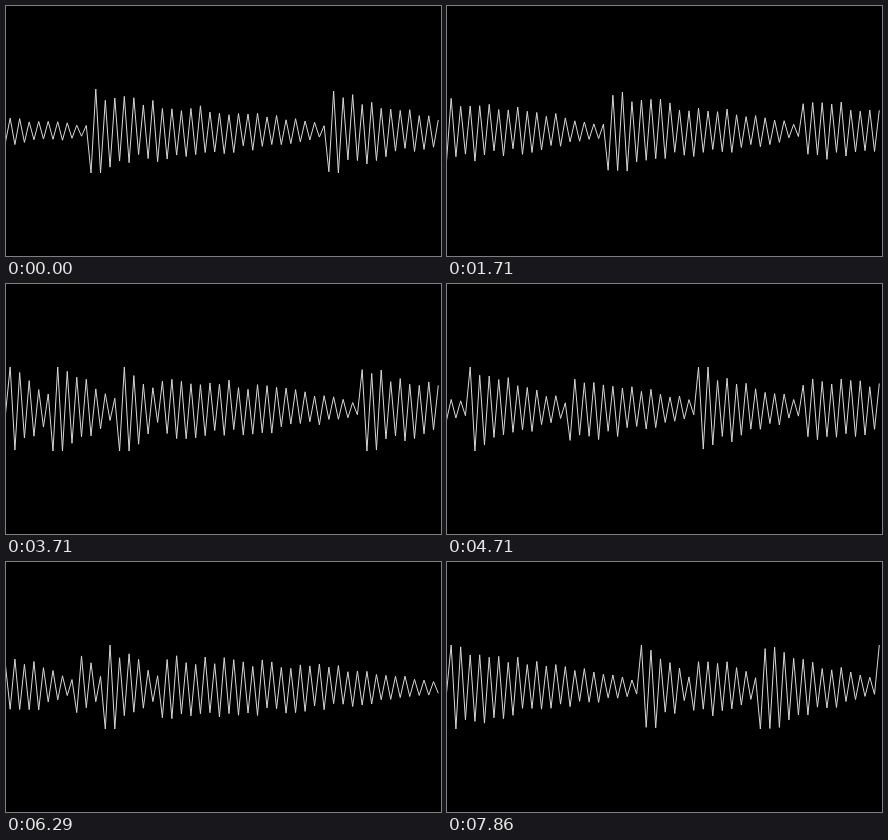
An HTML page with a canvas for the animation above (8 s loop, 435 px wide and 250 px high).

```html
<!DOCTYPE html>
<html lang="en">
<head>
<meta charset="utf-8">
<title>Waveform</title>
<style>
  html, body { margin: 0; width: 100%; height: 100%; overflow: hidden; background: #000; }
  canvas { display: block; width: 100%; height: 100%; }
</style>
</head>
<body>
<canvas id="stage" width="435" height="250"></canvas>
<script>
const ctx = document.getElementById('stage').getContext('2d');
const LOOP = 8000, FPS = 7;
const POINTS = 92, PITCH = 4.757, LEFT = -0.6;
const MID = 125, PEAK = 42;
const FLOOR = 5, BODY = 22, ACCENT = 18;
const SCROLL = 14.475; // samples per step

// Onsets along the strip, in samples: hard ones get an extra accent.
const hard = [18, 68, 167, 208, 308, 335, 377, 386, 400, 451, 483, 531, 595, 658, 763, 797, 837, 862, 887];
const soft = [-70, 97, 249, 282, 409, 504, 553, 635, 652, 670, 729, 848, 930];
const onsets = [...hard, ...soft].sort((a, b) => a - b);

function random(seed) {
  const v = Math.sin(seed * 127.1 + 3.7) * 43758.5453;
  return v - Math.floor(v);
}

// Each note starts loud and fades until the next onset.
function loudness(n) {
  const next = onsets.findIndex(onset => onset > n);
  const start = onsets[next - 1];
  const age = n - start;
  const progress = age / (onsets[next] - start);
  const accent = hard.includes(start) ? ACCENT * Math.exp(-age / 5) : 0;
  return FLOOR + BODY * (1 - progress ** 2) + accent;
}

// Successive samples swing above and below the middle line.
function sampleY(n) {
  const swing = Math.min(PEAK, loudness(n) * (0.82 + 0.36 * random(n)));
  return MID + (n % 2 ? -swing : swing);
}

function draw(step) {
  const first = Math.round(step * SCROLL);
  ctx.fillStyle = '#000';
  ctx.fillRect(0, 0, 435, 250);
  ctx.beginPath();
  for (let i = 0; i < POINTS; i++) ctx.lineTo(LEFT + i * PITCH, sampleY(first + i));
  ctx.strokeStyle = '#d8d8d8';
  ctx.lineWidth = 1;
  ctx.lineJoin = 'round';
  ctx.stroke();
}

const began = performance.now();
function tick() {
  const t = (performance.now() - began) % LOOP;
  draw(Math.floor(t * FPS / 1000 + 0.03) % (LOOP * FPS / 1000));
  requestAnimationFrame(tick);
}
tick();
</script>
</body>
</html>
```
